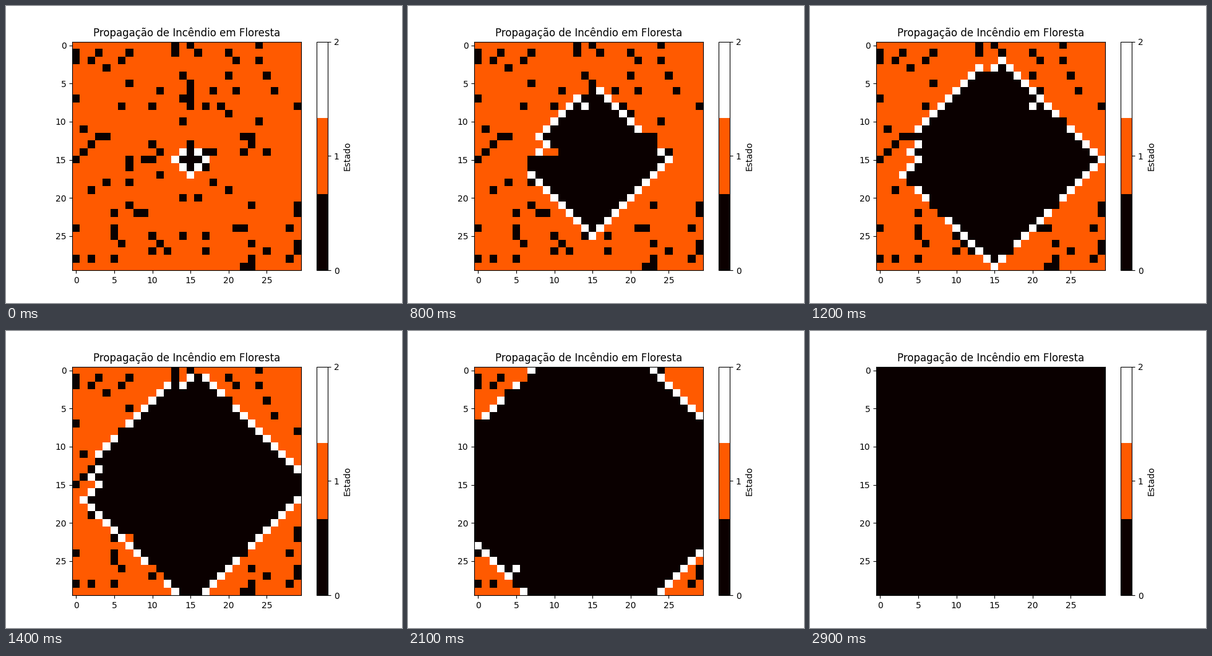
Animation of 640 by 480 pixels, one loop 5 s. Source, as a matplotlib script:

```python
import matplotlib.pyplot as plt
import numpy as np
from matplotlib.animation import FuncAnimation

SIZE = 30
FRAMES = 50
INTERVAL = 100
BURNT_STEPS = 2  # the fire has already spread this far when the loop starts
EMPTY, TREE, FIRE = 0, 1, 2

# Columns without trees, one entry per row.
CLEARINGS = [
    [13, 15, 24], [0, 3, 7, 13, 16, 20], [0, 2, 6, 21, 24], [4],
    [14, 20, 25], [7, 15], [11, 15, 18, 21, 26], [0, 14, 15],
    [6, 10, 15, 17, 19, 29], [20], [14, 24], [1],
    [3, 4, 22, 23], [2, 10, 15, 23], [1, 11, 17, 18, 22, 25], [0, 7, 9, 10],
    [7, 17], [11], [4, 7, 18], [2, 20],
    [14, 16], [7, 23, 29], [5, 8, 9, 29], [],
    [0, 5, 21, 22, 28], [5, 10, 14, 17], [6, 11, 23, 29], [10, 12, 17, 25, 29],
    [0, 2, 5, 23, 28], [22, 23],
]


def plant_forest():
    forest = np.full((SIZE, SIZE), TREE)
    for row, columns in enumerate(CLEARINGS):
        forest[row, columns] = EMPTY
    forest[SIZE // 2, SIZE // 2] = FIRE
    return forest


def spread(forest):
    """Burning cells die out and ignite the trees on their four sides."""
    fire = np.pad(forest == FIRE, 1)
    near = fire[:-2, 1:-1] | fire[2:, 1:-1] | fire[1:-1, :-2] | fire[1:-1, 2:]
    after = np.where(forest == FIRE, EMPTY, forest)
    after[(forest == TREE) & near] = FIRE
    return after


def simulate():
    states = [plant_forest()]
    for _ in range(FRAMES + BURNT_STEPS - 1):
        states.append(spread(states[-1]))
    return states[BURNT_STEPS:]


states = simulate()

fig, ax = plt.subplots(figsize=(6.4, 4.8), dpi=100)
image = ax.imshow(states[0], cmap=plt.get_cmap("hot", 3), vmin=EMPTY, vmax=FIRE)
fig.colorbar(image, ax=ax, ticks=[EMPTY, TREE, FIRE], label="Estado")
ax.set_title("Propagação de Incêndio em Floresta")


def update(frame):
    image.set_data(states[frame])
    return [image]


anim = FuncAnimation(fig, update, frames=FRAMES, interval=INTERVAL,
                     repeat=True, repeat_delay=0)
plt.show()
```
